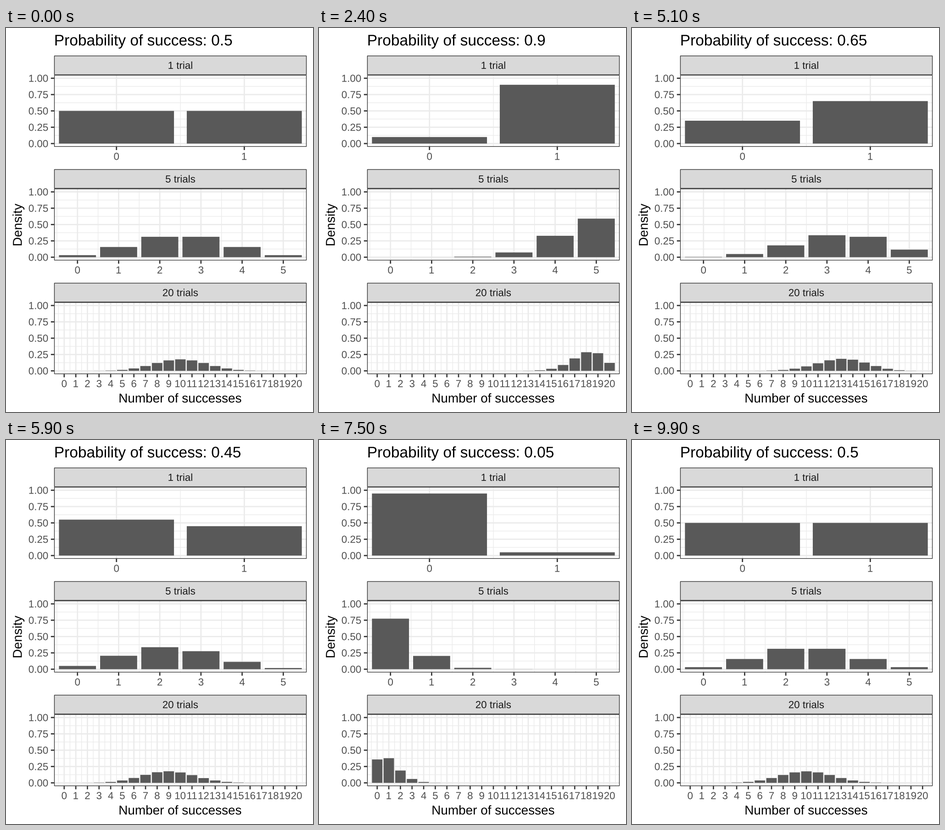
Animation, 669 px wide and 837 px high, one loop 10 s. Source, as a matplotlib script:

```python
from math import comb

import matplotlib.pyplot as plt
from matplotlib.animation import FuncAnimation
from matplotlib.patches import PathPatch, Rectangle
from matplotlib.textpath import TextPath
from matplotlib.transforms import Affine2D

W, H, DPI = 669, 837, 64
BASE = 27.9                      # base font size in pixels
SMALL, LARGE = 0.8 * BASE, 1.2 * BASE
LINE = 0.097 * BASE              # major grid line width
TICK = BASE / 4
GAP = 0.2 * BASE

LEFT, RIGHT = 104.8, 655.2
MID = (LEFT + RIGHT) / 2
BAR_L, BAR_R = 115.4, 644.6
ZERO, PITCH, UNIT = 251.9, 247.7, 142.4
PAD = 0.05 * UNIT
STRIP = 42.3
TRIALS = (1, 5, 20)

GRID, DARK, BAR = "#ebebeb", "#333333", "#595959"

# Success probability in twentieths: up to 1, down to 0, back to the middle
PATH = [*range(10, 21), *range(20, -1, -1), *range(11)]

fig = plt.figure(figsize=(W / DPI, H / DPI), dpi=DPI, facecolor="white")
ax = fig.add_axes([0, 0, 1, 1])
ax.set_xlim(0, W)
ax.set_ylim(H, 0)
ax.axis("off")


def rect(x0, y0, x1, y1, color):
    return ax.add_patch(Rectangle((x0, y0), x1 - x0, y1 - y0, fc=color,
                                  lw=0, snap=False))


def border(x0, y0, x1, y1):
    d = LINE / 4
    ax.add_patch(Rectangle((x0 + d, y0 + d), x1 - x0 - 2 * d, y1 - y0 - 2 * d,
                           fill=False, ec=DARK, lw=LINE / 2 * 72 / DPI,
                           joinstyle="miter", snap=False))


def hline(y, x0, x1, width, color):
    rect(x0, y - width / 2, x1, y + width / 2, color)


def vline(x, y0, y1, width, color):
    rect(x - width / 2, y0, x + width / 2, y1, color)


def text_path(s, x, y, size, align="left", angle=0):
    path = TextPath((0, 0), s, size=size, prop={"family": "Liberation Sans"})
    box = path.get_extents()
    shift = {"left": 0, "center": (box.x0 + box.x1) / 2,
             "right": box.x1 + 0.04 * size}[align]
    move = Affine2D().translate(-shift, 0).rotate_deg(angle)
    return move.scale(1, -1).translate(x, y).transform_path(path)


def label(s, x, y, size, color, align="center", angle=0):
    path = text_path(s, x, y, size, align, angle)
    return ax.add_patch(PathPatch(path, fc=color, lw=0, snap=False))


def make_panel(n, zero):
    """Draw one facet and return its bars."""
    top, bottom = zero - UNIT - PAD, zero + PAD
    step = (BAR_R - BAR_L) / (n + 0.9)

    def px(k):
        return BAR_L + (k + 0.45) * step

    for i in range(4):
        hline(zero - (i + 0.5) / 4 * UNIT, LEFT, RIGHT, LINE / 2, GRID)
    for k in range(-1, n + 1):
        if LEFT < px(k + 0.5) < RIGHT:
            vline(px(k + 0.5), top, bottom, LINE / 2, GRID)
    for i in range(5):
        y = zero - i / 4 * UNIT
        hline(y, LEFT, RIGHT, LINE, GRID)
        hline(y, LEFT - TICK, LEFT, LINE, DARK)
        label(f"{i / 4:.2f}", LEFT - TICK - GAP, y + 0.35 * SMALL, SMALL,
              "#4d4d4d", "right")
    for k in range(n + 1):
        vline(px(k), top, bottom, LINE, GRID)
        vline(px(k), bottom, bottom + TICK, LINE, DARK)
        label(str(k), px(k), bottom + TICK + GAP + 0.71 * SMALL, SMALL,
              "#4d4d4d")

    bars = [rect(px(k - 0.45), zero, px(k + 0.45), zero, BAR)
            for k in range(n + 1)]
    border(LEFT, top, RIGHT, bottom)
    rect(LEFT, top - STRIP, RIGHT, top, "#d9d9d9")
    border(LEFT, top - STRIP, RIGHT, top)
    label(f"{n} trial{'s' if n > 1 else ''}", MID,
          top - STRIP / 2 + 0.35 * SMALL, SMALL, "#1a1a1a")
    return bars


panels = [make_panel(n, ZERO + i * PITCH) for i, n in enumerate(TRIALS)]
label("Number of successes", MID, 816.3, BASE, "black")
label("Density", 34.4, 428.3, BASE, "black", angle=90)
title = label("Probability", LEFT, 38, LARGE, "black", "left")


def prob(i):
    # Three frames per state at first, then two
    state = (i + 1) // 3 if i < 44 else 15 + (i - 44) // 2
    return PATH[state] / 20


def update(i):
    p = prob(i)
    for n, bars in zip(TRIALS, panels):
        for k, bar in enumerate(bars):
            bar.set_height(-UNIT * comb(n, k) * p**k * (1 - p)**(n - k))
    # The title follows the bars one frame later
    shown = prob(max(i - 1, 0))
    title.set_path(text_path(f"Probability of success: {shown:g}",
                             LEFT, 38, LARGE))
    return [title, *(b for bars in panels for b in bars)]


anim = FuncAnimation(fig, update, frames=100, interval=100, repeat=True,
                     repeat_delay=0, blit=False)
plt.show()
```
